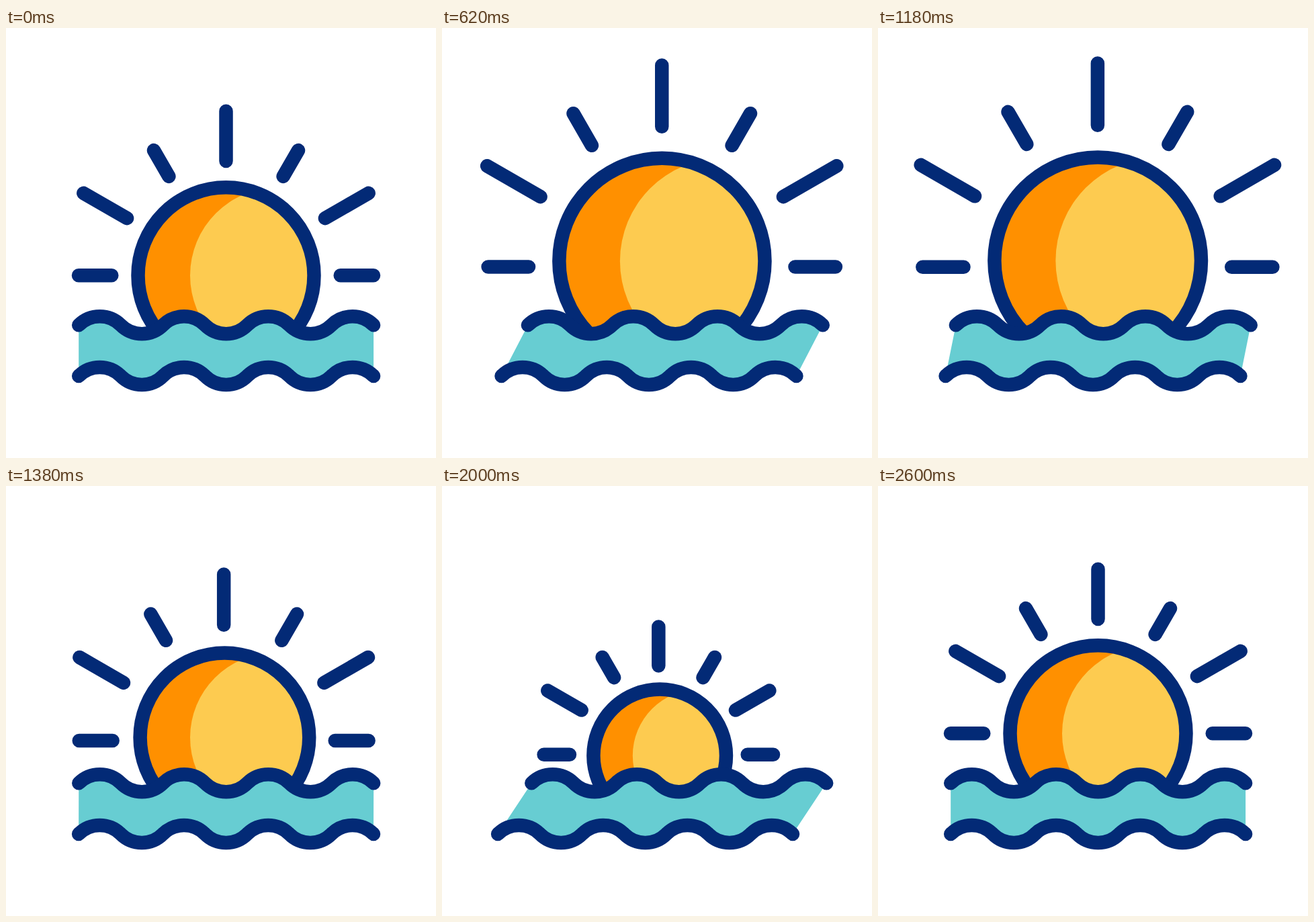
Animation, 640 px wide and 640 px high, one loop 2820 ms. Source, as an HTML page:

```html
<!DOCTYPE html>
<html lang="en">
<head>
<meta charset="utf-8">
<title>Sun over waves</title>
<style>
  html, body { margin: 0; width: 100%; height: 100%; overflow: hidden; background: #fff; }
  svg { display: block; width: 640px; height: 640px; }
  .line { fill: none; stroke: #032a76; stroke-width: 20.5; stroke-linecap: round; vector-effect: non-scaling-stroke; }
</style>
</head>
<body>
<svg width="640" height="640">
  <clipPath id="disc"><circle r="131"/></clipPath>
  <path id="rays" class="line"/>
  <g id="sun">
    <circle r="131" fill="#ff9000"/>
    <circle cx="77.5" r="131" fill="#fdcb50" clip-path="url(#disc)"/>
    <circle r="131" class="line"/>
  </g>
  <path id="water" fill="#67cdd2"/>
  <path id="crest" class="line"/>
  <path id="base" class="line"/>
</svg>
<script>
const LOOP = 2820, DELAY = 200, STEP = 20, LAST = 120;
const $ = id => document.getElementById(id);
const [rays, sun, water, crest, base] = ['rays', 'sun', 'water', 'crest', 'base'].map($);

const smooth = p => p * p * (3 - 2 * p);

// cubic-bezier(1/3, 0, 0, 1)
function settle(p) {
  let lo = 0, hi = 1;
  for (let i = 0; i < 30; i++) {
    const s = (lo + hi) / 2;
    if (s * (1 - s) ** 2 + s ** 3 < p) lo = s; else hi = s;
  }
  return lo * lo * (3 - 2 * lo);
}

// Poses: sun x, y, scale; rays x, y, scale; inward slide of the level rays
const rest = [327.5, 368.3, 1, 327.5, 368.3, 1, 0];
const high = [327.4, 342.9, 1.2, 327.2, 353, 1.268, 12.35];
const low = [323, 412.8, 0.668, 320.5, 410.8, 0.7, 0];
const keys = [
  { at: 0, pose: rest, ease: settle },
  { at: 45, pose: high, ease: smooth },
  { at: 75, pose: low, ease: smooth },
  { at: LAST, pose: rest }
];

function poseAt(n) {
  const i = n < 45 ? 0 : n < 75 ? 1 : 2;
  const a = keys[i], b = keys[i + 1];
  const p = a.ease((n - a.at) / (b.at - a.at));
  return a.pose.map((v, j) => v + (b.pose[j] - v) * p);
}

const INNER = 170.2;
const OUTER = [219.5, 245, 215, 244.6, 215, 245, 219.5];

function rayPath(x, y, scale, slide) {
  return OUTER.map((outer, i) => {
    const c = Math.cos(i * Math.PI / 6), s = Math.sin(i * Math.PI / 6);
    const dx = i === 0 ? -slide : i === 6 ? slide : 0;
    const point = r => `${x + dx + c * r * scale} ${y - s * r * scale}`;
    return `M${point(INNER)}L${point(outer)}`;
  }).join('');
}

// Seven quarter-circle arcs, alternately up and down
const ARC = 62.7, RADIUS = ARC / Math.SQRT2;
const arcs = dir => Array.from({ length: 7 }, (_, i) =>
  `a${RADIUS} ${RADIUS} 0 0 ${(i + (dir > 0)) % 2} ${dir * ARC} 0`).join('');
const FORTH = arcs(1), BACK = arcs(-1);

function draw(n) {
  const [sx, sy, sk, rx, ry, rk, slide] = poseAt(n);
  sun.setAttribute('transform', `translate(${sx} ${sy}) scale(${sk})`);
  rays.setAttribute('d', rayPath(rx, ry, rk, slide));

  const q = (n % 60) / 30;
  const shift = 25.1 * smooth(q < 1 ? q : 2 - q);
  const left = 108.2, top = `M${left + shift} 442.2${FORTH}`;
  crest.setAttribute('d', top);
  base.setAttribute('d', `M${left - shift} 518${FORTH}`);
  // Walking back, each arc turns the other way
  water.setAttribute('d', `${top}L${left - shift + 7 * ARC} 518${BACK}Z`);
}

const start = performance.now();
function tick() {
  const t = (performance.now() - start) % LOOP;
  const n = Math.floor((t - DELAY) / STEP + 1e-6);
  draw(Math.max(0, Math.min(LAST, n)));
  requestAnimationFrame(tick);
}
tick();
</script>
</body>
</html>
```
